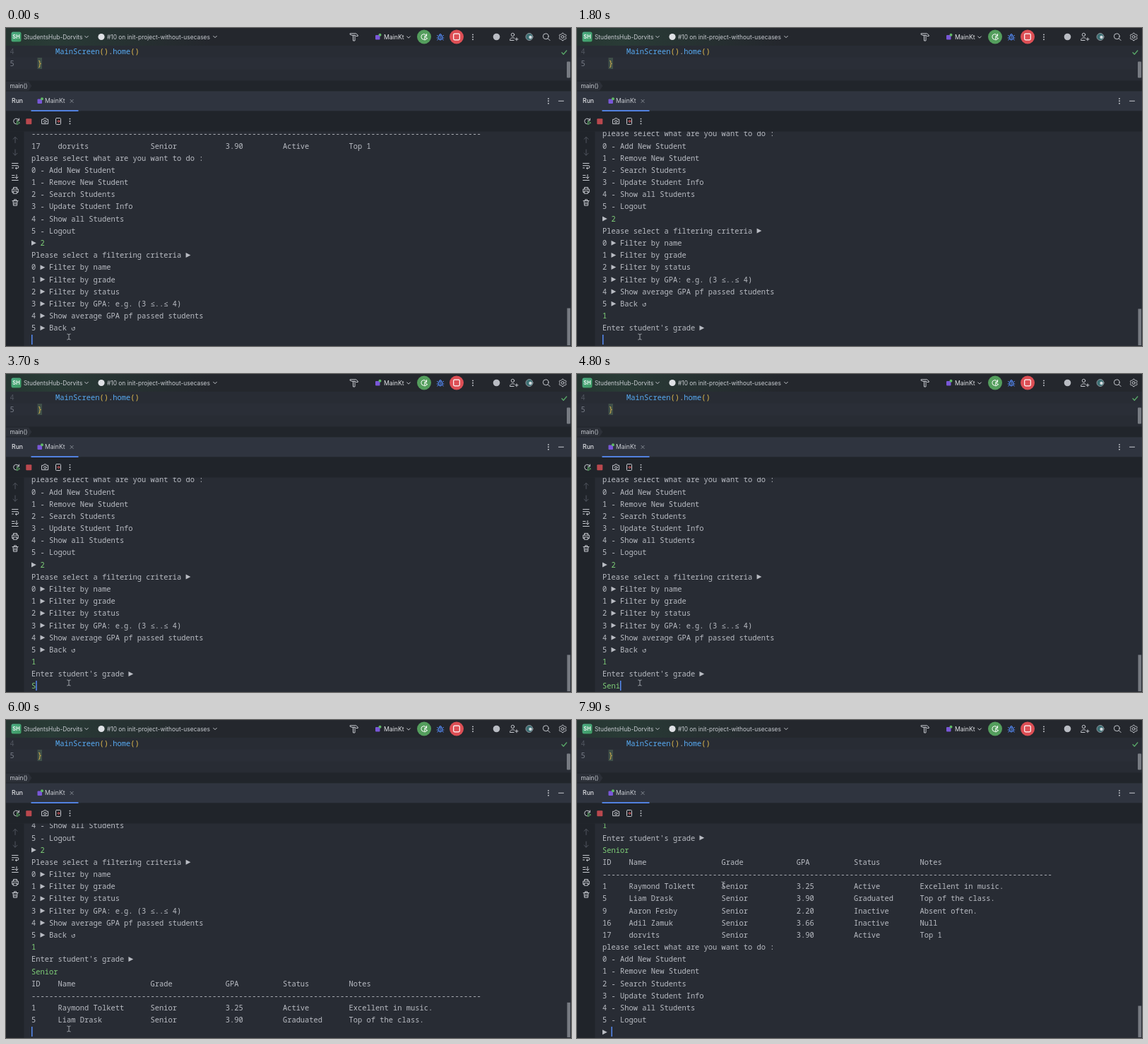
Animation, 800 px wide and 450 px high, one loop 8000 ms. Source, as an HTML page:

```html
<!DOCTYPE html>
<html lang="en">
<head>
<meta charset="utf-8">
<title>Run console</title>
<style>
html, body { margin: 0; width: 100%; height: 100%; overflow: hidden; background: #282c34; }
svg { display: block; width: 100vw; height: 100vh; }
text { white-space: pre; }
.ui { font: 8.4px Inter, "Open Sans", sans-serif; fill: #c9ccd2; }
.mono { font: 10.41px "Noto Sans Mono", "DejaVu Sans Mono", monospace; fill: #b9bcc3; font-variant-ligatures: none; }
.mono .in { fill: #7fcf78; }
.fn { fill: #57aaf2; }
.br { fill: #e3bd4f; }
.num { fill: #50555f; }
.icon { fill: none; stroke: #c6c9cf; stroke-width: 1; stroke-linecap: round; stroke-linejoin: round; }
.dim { stroke: #50555e; }
</style>
</head>
<body>
<svg viewBox="0 0 800 450" preserveAspectRatio="none">
  <defs>
    <linearGradient id="bar">
      <stop offset="0" stop-color="#263531"/>
      <stop offset=".08" stop-color="#293b36"/>
      <stop offset=".36" stop-color="#24272d"/>
      <stop offset="1" stop-color="#24272d"/>
    </linearGradient>
    <linearGradient id="badge" x2="1" y2="1">
      <stop offset="0" stop-color="#4fae86"/>
      <stop offset="1" stop-color="#3d9a62"/>
    </linearGradient>
    <clipPath id="view"><rect x="26" y="146.5" width="774" height="303.5"/></clipPath>
    <path id="chev" class="icon" d="M-2.3-1.1 0 1.2 2.3-1.1"/>
    <g id="dots" fill="#c6c9cf">
      <circle cy="-3.4" r=".95"/><circle r=".95"/><circle cy="3.4" r=".95"/>
    </g>
    <path id="rerun" d="M3.4-1.4A3.9 3.9 0 1 0-.5 3.9M3.6-4v2.800H.8"/>
    <path id="play" d="M.8.2v4.400l3.600-2.200z"/>
    <g id="app">
      <rect x="-3.5" y="-3" width="6.5" height="6.5" rx="1" fill="#7957d8"/>
      <circle cx="3" cy="-3.3" r="2" fill="#5fb865"/>
    </g>
  </defs>

  <!-- panels -->
  <rect width="800" height="450" fill="#282c34"/>
  <rect width="800" height="25" fill="url(#bar)"/>
  <rect y="41.5" width="800" height="17" fill="#2a2e37"/>
  <rect y="74.5" width="800" height="15" fill="#21252b"/>
  <path d="M0 75.5h32l4.5 6.500-4.500 6.500H0z" fill="#2c3038"/>
  <rect y="89.5" width="800" height="28" fill="#2f343f"/>
  <rect y="117.5" width="800" height="29" fill="#20242a"/>
  <rect y="146.5" width="25.5" height="303.5" fill="#20242a"/>

  <!-- top bar -->
  <rect x="7.5" y="5.5" width="14" height="14" rx="2.5" fill="url(#badge)"/>
  <text class="ui" x="14.5" y="15.2" text-anchor="middle" style="font-size:7.4px;font-weight:600;fill:#fff">SH</text>
  <text class="ui" x="25" y="15.5">StudentsHub-Dorvits</text>
  <use href="#chev" x="114" y="12.5"/>
  <circle cx="135" cy="12.5" r="4.6" fill="#dfe1e5"/>
  <text class="ui" x="143" y="15.5">#10 on init-project-without-usecases</text>
  <use href="#chev" x="296" y="12.5"/>
  <path class="icon" d="M487.500 7.800h8l2.700 2.200v1.500h-2.500l-1.200-1.200h-4.500l-2.500-1zM491.500 10.500v7.500h2.500v-7.500"/>
  <use href="#app" x="526.5" y="13"/>
  <text class="ui" x="535" y="16" style="font-size:8.7px;fill:#dfe1e5">MainKt</text>
  <use href="#chev" x="570" y="13"/>
  <circle cx="592" cy="12.5" r="10" fill="#549e5d"/>
  <g class="icon" style="stroke:#fff">
    <use href="#rerun" x="592" y="12.5"/>
    <use href="#play" x="592" y="12.5"/>
  </g>
  <g class="icon" style="stroke:#548af7">
    <ellipse cx="615" cy="13.5" rx="2.5" ry="3.6"/>
    <path d="M613.300 10.500a1.700 2 0 0 1 3.400 0M612.500 12l-2-1.500M612.500 14h-2.300M612.700 15.500l-2 1.500M617.500 12l2-1.500M617.500 14h2.300M617.300 15.500l2 1.500M615 11v5.500"/>
  </g>
  <circle cx="638" cy="12.5" r="10" fill="#dd4f55"/>
  <rect x="633.7" y="8.2" width="8.6" height="8.6" rx="1.5" fill="none" stroke="#fff" stroke-width="1.2"/>
  <use href="#dots" x="661" y="12.8"/>
  <circle cx="694.5" cy="12.5" r="4.8" fill="#b9bcc3"/>
  <g class="icon">
    <circle cx="717.5" cy="9.5" r="2.2"/>
    <path d="M720 14.300c-3-1.500-6.500 0-6.500 3.200h5.500M721 15.800h4M723 13.800v4"/>
    <circle cx="741" cy="12.5" r="5" fill="#3b6f73" stroke="#8d9299"/>
    <circle cx="764.3" cy="11.8" r="3.9"/>
    <path d="M767.200 14.700l2.900 2.900"/>
    <g id="gear" transform="translate(788.3 12.5)"><circle r="1.9"/></g>
  </g>
  <circle cx="742.5" cy="13" r="2.2" fill="#d5dbe0"/>

  <!-- editor -->
  <g class="mono">
    <text class="num" x="5.5" y="37">4</text>
    <text class="num" x="5.5" y="54" style="fill:#777c87">5</text>
    <text x="70" y="37"><tspan class="fn">MainScreen</tspan><tspan class="br">()</tspan>.<tspan class="fn">home</tspan><tspan class="br">()</tspan></text>
    <rect x="44.5" y="42" width="6.5" height="16" fill="#3f4f48"/>
    <text class="br" x="44.7" y="53.5">}</text>
  </g>
  <path class="icon" style="stroke:#59a869;stroke-width:1.3" d="M787 34.800l2.300 2.400 4.500-5.200"/>
  <rect x="794" y="47.5" width="5" height="23" rx="1" fill="#777b82"/>
  <text class="ui" x="5.5" y="85">main()</text>

  <!-- run header -->
  <text class="ui" x="8" y="106.3" style="font-size:8.7px;font-weight:500;fill:#dfe1e5">Run</text>
  <use href="#app" x="48" y="103.5"/>
  <text class="ui" x="55" y="106.3" style="font-size:8.7px">MainKt</text>
  <path class="icon" style="stroke:#8b9099;stroke-width:.9" d="M91 101.300l4.200 4.200M95.200 101.300l-4.200 4.200"/>
  <rect x="35.5" y="116.2" width="67" height="1.8" fill="#568af2"/>
  <use href="#dots" x="768" y="103.3"/>
  <path class="icon" d="M782.500 103.300h7"/>

  <!-- run toolbar -->
  <g class="icon">
    <use href="#rerun" x="14.8" y="132"/>
    <use href="#play" x="14.8" y="132" style="stroke:#62b36a"/>
    <path d="M51 129.300h2l1-1.500h2.600l1 1.500h2v6.300H51z"/>
    <circle cx="55.3" cy="132.3" r="1.7"/>
    <rect x="70.5" y="127.5" width="7" height="9" rx="1"/>
    <path style="stroke:#dd5a5c" d="M72.500 132h3.500M74.500 130.400l1.600 1.600-1.600 1.600"/>
  </g>
  <rect x="28.3" y="128.2" width="8" height="8" rx="1" fill="#b9484e"/>
  <use href="#dots" x="90.5" y="132"/>

  <!-- side icons -->
  <g class="icon">
    <path class="dim" d="M13 162.500v-8M10 157.300l3-3 3 3M13 172v8M10 177.200l3 3 3-3"/>
    <path d="M8.500 191.500h8.500M8.500 194.700h7.500a1.800 1.800 0 0 1 0 3.700h-2.500M14.800 197l-1.500 1.400 1.500 1.400M8.500 198h2"/>
    <path d="M8.500 208.500h3.500M8.500 211.500h3.500M8.500 215.500h8.700M15 207.500v5.300M13 211l2 2 2-2"/>
    <path d="M10.500 228v-2.500h5v2.500M10.500 232.500H8.700V228h8.600v4.500h-1.800M10.500 230.800h5v3.400h-5z"/>
    <path d="M9 244.500h8M11.500 244.300v-1.500h3v1.500M10 244.700l.5 6.500h5l.5-6.500M12 246.800v2.500M14 246.800v2.500"/>
  </g>

  <!-- console -->
  <g clip-path="url(#view)"><g id="doc" class="mono"></g></g>
  <rect id="caret" y="434" width="1.5" height="14" fill="#568af2"/>
  <rect id="thumb" x="794.5" width="4.5" fill="#777b82"/>
  <path id="mouse" class="icon" style="stroke:#a9adb4;stroke-width:.9" d="M-2.200-4Q0-4 0-2.800Q0-4 2.200-4M0-3v6M-2.200 4Q0 4 0 2.800Q0 4 2.200 4"/>
</svg>
<script>
const LOOP = 8000, X0 = 36, COL = 6.246, ROW = 17.175, BASE = 153.4, SLOTS = 17;
const NS = "http://www.w3.org/2000/svg";
const $ = id => document.getElementById(id);

const stops = [0, 6, 27, 44, 57, 72];
const record = (...cells) =>
  cells.reduce((s, cell, i) => s.padEnd(stops[i]) + cell, "");
const dashes = "-".repeat(102);
const last = record("17", "dorvits", "Senior", "3.90", "Active", "Top 1");
const menu = [
  "please select what are you want to do :",
  "0 - Add New Student", "1 - Remove New Student", "2 - Search Students",
  "3 - Update Student Info", "4 - Show all Students", "5 - Logout"
];

// "~" separates program output from what the user types
const lines = [
  dashes, last, ...menu, "▶ ~2",
  "Please select a filtering criteria ▶",
  "0 ▶ Filter by name", "1 ▶ Filter by grade", "2 ▶ Filter by status",
  "3 ▶ Filter by GPA: e.g. (3 ≤..≤ 4)",
  "4 ▶ Show average GPA pf passed students", "5 ▶ Back ↺",
  "~1", "Enter student's grade ▶", "~Senior",
  record("ID", "Name", "Grade", "GPA", "Status", "Notes"), dashes,
  record("1", "Raymond Tolkett", "Senior", "3.25", "Active", "Excellent in music."),
  record("5", "Liam Drask", "Senior", "3.90", "Graduated", "Top of the class."),
  record("9", "Aaron Fesby", "Senior", "2.20", "Inactive", "Absent often."),
  record("16", "Adil Zamuk", "Senior", "3.66", "Inactive", "Null"),
  last, ...menu, "▶ ~"
];

// time and the line holding the caret from then on
const prints = [[0, 17], [1700, 19], [5900, 22], [6000, 24], [6100, 26], [6200, 34]];
const keys = { 17: [1200], 19: [3600, 4000, 4350, 4700, 5050, 5400] };
const moves = [...prints.map(p => p[0]), ...keys[17], ...keys[19]];

function add(tag, parent, attrs) {
  const el = document.createElementNS(NS, tag);
  for (const k in attrs) el.setAttribute(k, attrs[k]);
  return parent.appendChild(el);
}

function drawGear() {
  const steps = 48;
  const pts = Array.from({ length: steps }, (_, i) => {
    const a = i / steps * 2 * Math.PI;
    const r = 4.7 + 0.6 * Math.tanh(3 * Math.cos(6 * a));
    return `${r * Math.sin(a)},${r * Math.cos(a)}`;
  });
  add("polygon", $("gear"), { points: pts.join(" ") });
}

const rows = lines.map((line, i) => {
  const g = add("g", $("doc"), { transform: `translate(${X0} ${BASE + i * ROW})` });
  const [out, typed = ""] = line.split("~");
  add("text", g, {}).textContent = out.replaceAll("▶", " ");
  [...out].forEach((ch, c) => {
    if (ch === "▶") add("path", g, { d: `M${c * COL} -7.2l6.8 3.5-6.8 3.5z` });
  });
  const input = add("text", g, { x: out.length * COL, class: "in" });
  input.textContent = typed;
  return { g, input, typed, lead: out.length, prompt: line.includes("~") };
});

function draw(t) {
  const cur = prints.filter(p => p[0] <= t).pop()[1];
  const scroll = cur - SLOTS;
  rows.forEach((r, i) => {
    r.g.style.display = i < cur || (i === cur && r.prompt) ? "" : "none";
    r.shown = keys[i] ? r.typed.slice(0, keys[i].filter(k => k <= t).length) : r.typed;
    if (r.input.textContent !== r.shown) r.input.textContent = r.shown;
  });
  $("doc").setAttribute("transform", `translate(0 ${-scroll * ROW})`);

  const row = rows[cur];
  const cols = row.prompt ? row.lead + row.shown.length : 0;
  const fresh = moves.some(m => t >= m && t - m < 500);
  $("caret").setAttribute("x", X0 + cols * COL);
  $("caret").style.display = fresh || (t + 300) % 1000 < 500 ? "" : "none";

  const top = 396.5 + scroll * 0.47;
  $("thumb").setAttribute("y", top);
  $("thumb").setAttribute("height", 449 - top);

  const p = Math.min(1, Math.max(0, (t - 7200) / 600));
  const e = p * p * (3 - 2 * p);
  $("mouse").setAttribute("transform", `translate(${89 + 118 * e} ${437 - 204 * e})`);
}

function tick() {
  draw(performance.now() % LOOP);
  requestAnimationFrame(tick);
}
drawGear();
tick();
</script>
</body>
</html>
```
